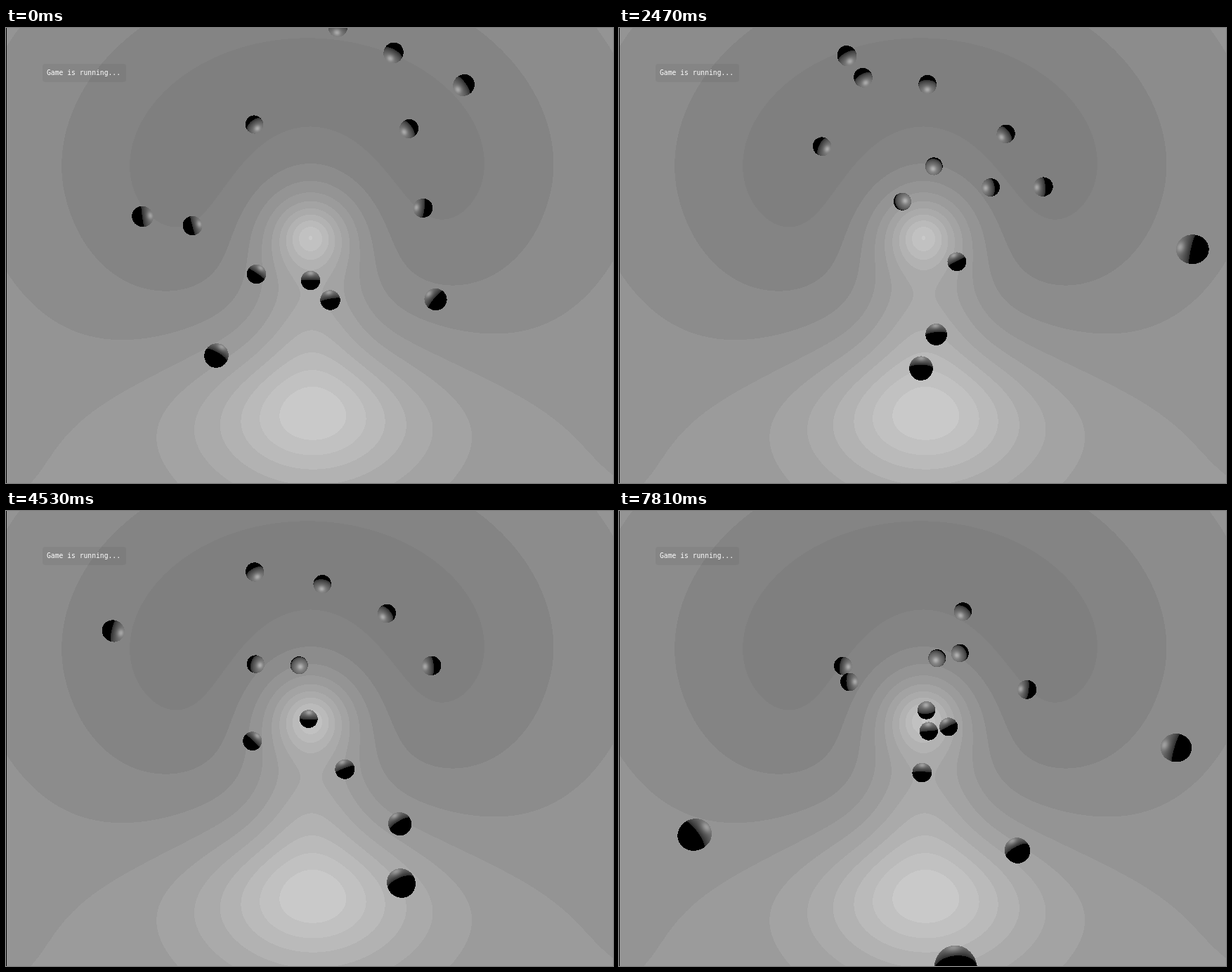
An HTML page with a canvas that plays this animation: 864x648 px, repeating every 7930 ms.

```html
<!DOCTYPE html>
<html lang="en">
<head>
<meta charset="utf-8">
<title>Orbiting balls</title>
<style>
  html, body { margin: 0; width: 100%; height: 100%; overflow: hidden; background: #939393; }
  canvas { position: absolute; left: 0; top: 0; display: block; }
  #status {
    position: absolute; left: 52px; top: 51px; width: 119px; height: 26px;
    box-sizing: border-box; padding-left: 6px; border-radius: 4px;
    background: rgba(0, 0, 0, .05); color: #fff; white-space: pre;
    font: 9.7px/25px "DejaVu Sans Mono", monospace;
  }
</style>
</head>
<body>
<canvas id="stage" width="864" height="648"></canvas>
<div id="status">Game is running...</div>
<script>
const W = 864, H = 648, FOCAL = 782;
const LOOP = 7930, STEP = LOOP / 58;
const ctx = document.getElementById('stage').getContext('2d');

// --- Backdrop: a smooth light field, cut into flat bands ---
const bump = (x, y, cx, cy, sx, sy) => Math.exp(-(((x - cx) / sx) ** 2) - ((y - cy) / sy) ** 2);

function lightField(x, y) {
  const dy = y - 235;
  const hollow = Math.hypot(x - 430, dy < 0 ? dy * 1.2 : dy) ** 3;
  const lamp = (Math.hypot(x - 433, y - 297) / 57.7) ** 1.75;
  const floor = ((x - 436) / 145) ** 2 + ((y - 541) / 118) ** 2;
  return -3.2 + 6.2 * hollow / (hollow + 340 ** 3)
    + 10.4 / (1 + lamp)
    + 8 / (1 + floor)
    + 1.9 * bump(x, y, 434, 420, 70, 80)
    + 1.5 * bump(x, y, 436, 560, 230, 85)
    + 0.8 * bump(x, y, 430, 140, 160, 110);
}

function paintBackdrop({ data }) {
  for (let y = 0, k = 0; y < H; y++) {
    for (let x = 0; x < W; x++, k += 4) {
      const band = Math.floor(lightField(x, y)) + 1;
      data[k] = data[k + 1] = data[k + 2] = x ? Math.max(127, 124.6 + 7.65 * band) : 0;
      data[k + 3] = 255;
    }
  }
}

// --- Ball paths: a few points [time, x, y] each ---
const paths = [];
const passBy = (...points) => paths.push(points);
const wander = (from, second, third, to) =>
  passBy([0, ...from], [3170, ...second], [5350, ...third], [7810, ...to]);

wander([420, -40], [288, 71], [117, 235], [433, 373]);
wander([472, -3], [326, 86], [372, 95], [318, 221]);
wander([551, 35], [421, 91], [475, 111], [489, 143]);
wander([651, 81], [531, 163], [546, 148], [468, 308]);
wander([573, 143], [424, 218], [442, 330], [437, 283]);
wander([353, 137], [294, 180], [486, 236], [452, 209]);
wander([265, 281], [418, 252], [284, 380], [106, 461]);
wander([593, 256], [605, 220], [602, 225], [580, 254]);
wander([461, 387], [518, 198], [266, 240], [328, 243]);
wander([433, 359], [498, 340], [581, 476], [484, 200]);
wander([356, 350], [472, 443], [489, 335], [567, 484]);
wander([299, 466], [468, 494], [593, 558], [478, 652]);

passBy([0, 194, 268], [1640, 193, 34], [2200, 205, -45]);
passBy([0, 611, 386], [1640, 735, 346], [3170, 890, 285]);
passBy([1100, 950, 520], [1640, 734, 632], [2400, 400, 780], [3170, 45, 579], [3460, -60, 490]);
passBy([5000, -40, 170], [5350, 40, 129], [6590, 261, 9], [7000, 320, -30]);
passBy([5500, 890, 350], [6590, 612, 314], [7810, 438, 313]);
passBy([6700, 890, 385], [7810, 791, 336]);

// Cubic Hermite through the points, with slopes from the neighbours.
function locate(path, t) {
  const last = path.length - 1, end = path[last][0];
  if (t < path[0][0] || (t > end && end < LOOP - STEP)) return null;
  let i = 0;
  while (i < last - 1 && t >= path[i + 1][0]) i++;
  const a = path[i], b = path[i + 1], span = b[0] - a[0];
  const u = Math.min(1, (t - a[0]) / span), ease = u * u * (3 - 2 * u);
  const slope = (k, axis) => {
    const p = path[Math.max(0, k - 1)], q = path[Math.min(last, k + 1)];
    return (q[axis] - p[axis]) / (q[0] - p[0]) * span;
  };
  return [1, 2].map(axis => a[axis] + (b[axis] - a[axis]) * ease
    + slope(i, axis) * u * (1 - u) ** 2 - slope(i + 1, axis) * u * u * (1 - u));
}

// --- Balls: size and lighting follow from the place on the curved field ---
function radiusAt(x, y) {
  const q = 2.1e-7 * (x - 425) ** 2 + 2.6e-7 * (y - 190) ** 2;
  return 1 / Math.max(.015, .0805 - q + 2.6 * q * q);
}

function lightAt(x, y) {
  const dx = 433 - x, dy = 238 - y, up = 300 - y;
  const depth = up > 0 ? 65 * (1 - Math.exp(-up / 50)) + up * .1 : -up * up / 450;
  const dz = depth - .1 * Math.abs(dx);
  const len = Math.hypot(dx, dy, dz) || 1;
  return [dx / len, dy / len, dz / len];
}

function drawBall(data, { x, y, r }) {
  const [lx, ly, lz] = lightAt(x, y);
  const half = Math.sqrt(2 + 2 * lz) || 1;
  const off = Math.hypot(x - W / 2, y - H / 2) || 1;
  const ex = (x - W / 2) / off, ey = (y - H / 2) / off;
  const reach = r * Math.hypot(1, off / FOCAL);
  const top = Math.max(0, Math.ceil(y - reach)), bottom = Math.min(H - 1, y + reach);
  const left = Math.max(1, Math.ceil(x - reach)), right = Math.min(W - 1, x + reach);
  for (let py = top; py <= bottom; py++) {
    for (let px = left; px <= right; px++) {
      const a = ((px - x) * ex + (py - y) * ey) / reach;
      const b = ((py - y) * ex - (px - x) * ey) / r;
      const rest = 1 - a * a - b * b;
      if (rest < 0) continue;
      const nx = a * ex - b * ey, ny = a * ey + b * ex, nz = Math.sqrt(rest);
      const diffuse = nx * lx + ny * ly + nz * lz;
      let gray = 0;
      if (diffuse > 0) {
        const shine = Math.max(0, (nx * lx + ny * ly + nz * (lz + 1)) / half);
        gray = 40 + 90 * diffuse ** .7 + 50 * shine ** 16;
      }
      const k = (py * W + px) * 4;
      data[k] = data[k + 1] = data[k + 2] = gray;
    }
  }
}

// --- Playback ---
const backdrop = ctx.createImageData(W, H);
const frame = ctx.createImageData(W, H);
paintBackdrop(backdrop);
let shown = -1;

function render(now) {
  const t = Math.floor(now % LOOP / STEP) * STEP;
  if (t === shown) return;
  shown = t;
  frame.data.set(backdrop.data);
  paths.map(path => locate(path, t))
    .filter(Boolean)
    .map(([x, y]) => ({ x, y, r: radiusAt(x, y) }))
    .sort((a, b) => a.r - b.r)
    .forEach(ball => drawBall(frame.data, ball));
  ctx.putImageData(frame, 0, 0);
}

const begin = performance.now();
function tick() {
  render(performance.now() - begin);
  requestAnimationFrame(tick);
}
tick();
</script>
</body>
</html>
```
